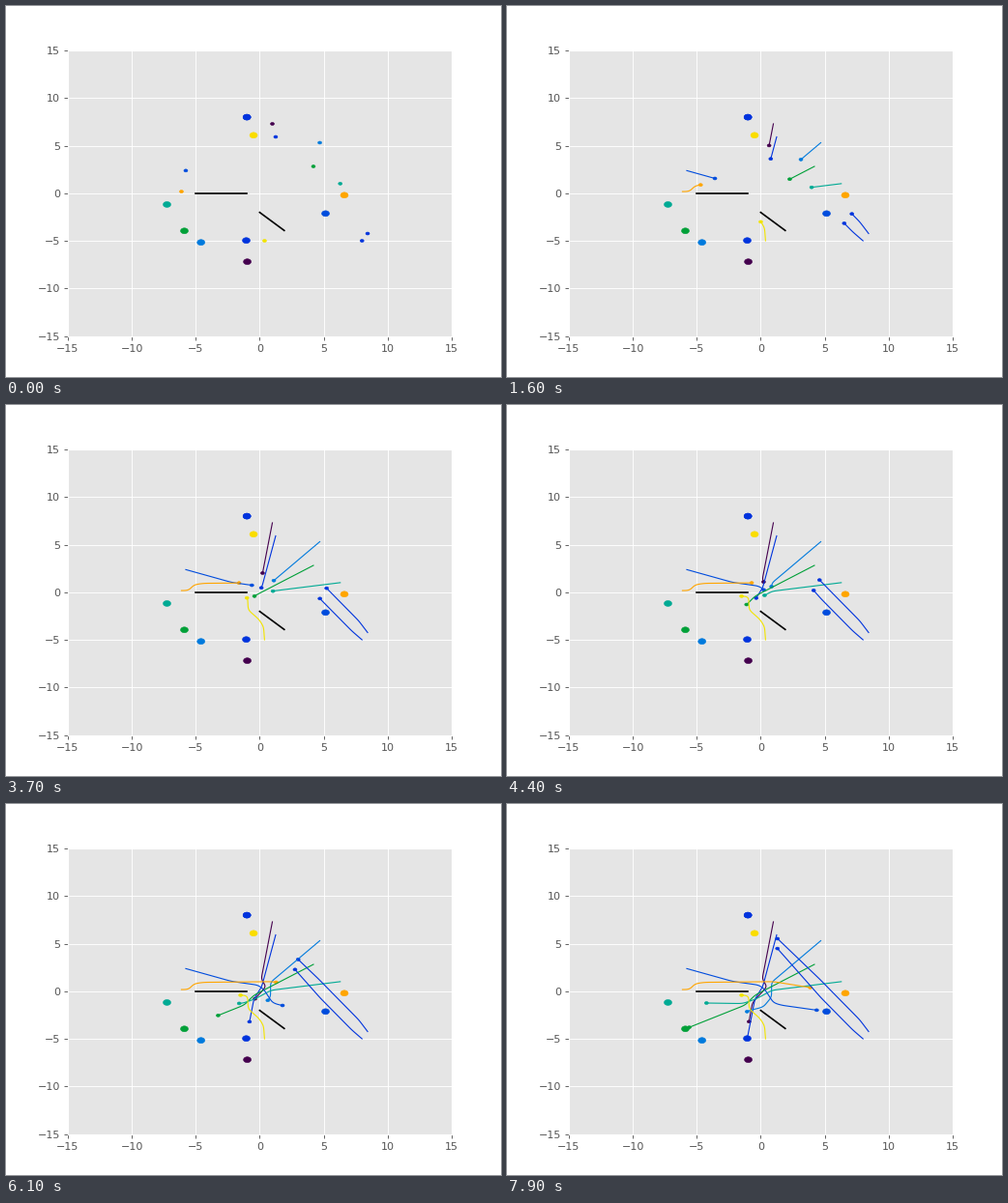
A matplotlib script for the animation above (8 s loop, 512x384 px).

```python
import numpy as np
import matplotlib.pyplot as plt
from matplotlib.animation import FuncAnimation
from matplotlib.patches import Circle

STEPS = 80
STEP_MS = 100
DS = 0.01      # spacing of points along a route
BEND = 60      # half-width of the corner rounding, in points
CROWD = 1.6    # radius of the busy centre

plt.style.use("ggplot")
fig, ax = plt.subplots(figsize=(6.4, 4.8), dpi=80)
ax.set(xlim=(-15, 15), ylim=(-15, 15))


def route(corners):
    """Evenly spaced points along a polyline with rounded corners."""
    xy = np.array(corners, float)
    dist = np.append(0, np.cumsum(np.hypot(*np.diff(xy, axis=0).T)))
    s = np.arange(0, dist[-1], DS)
    kernel = np.hanning(2 * BEND + 1)
    kernel /= kernel.sum()

    def rounded(c):
        padded = np.pad(np.interp(s, dist, c), BEND,
                        mode="reflect", reflect_type="odd")
        return np.convolve(padded, kernel, mode="valid")

    return np.array([rounded(c) for c in xy.T])


def travel(points, speed, pace, delay):
    """Positions per step; the pace changes inside the crowd."""
    s, path = 0, []
    for step in range(STEPS):
        pos = points[:, min(round(s / DS), points.shape[1] - 1)]
        path.append(pos)
        if step >= delay:
            s += speed * (pace if np.hypot(*pos) < CROWD else 1)
    return np.array(path).T


class Robot:
    def __init__(self, color, *corners, goal=None, goal_color=None,
                 speed=0.147, pace=1, delay=0):
        self.path = travel(route(corners), speed, pace, delay)
        ax.add_patch(Circle(goal or corners[-1], 0.3, color=goal_color or color))
        self.body = ax.add_patch(Circle(self.path[:, 0], 0.15, color=color))
        self.trail, = ax.plot([], [], color=color, lw=1)

    def move(self, step):
        self.body.center = tuple(self.path[:, step])
        end = step + 1 if step else 0
        self.trail.set_data(*self.path[:, :end])
        return self.body, self.trail


for xs, ys in (((-5, -1), (0, 0)), ((0, 1.92), (-2, -3.9))):
    ax.plot(xs, ys, color="black", lw=1.5)

robots = [
    Robot("#44004e", (0.99, 7.3), (0.12, 1.3), (0.5, 0.5), (-0.65, -1.2),
          (-0.97, -3.6), (-0.97, -7.18), speed=0.144, pace=0.9),
    Robot("#0033dd", (1.25, 5.93), (0.16, 0.5), (-0.45, -0.8), (-1.05, -4.95),
          pace=1.15),
    Robot("#007add", (4.7, 5.32), (0.85, 0.95), (0.85, -0.6), (0.2, -1.65),
          (-1.01, -2.05), (-4.59, -5.15), pace=0.65),
    Robot("#00a038", (4.2, 2.83), (-0.45, -0.4), (-1.2, -1.43), (-5.89, -3.94),
          pace=1.1),
    Robot("#00aa94", (6.3, 1.02), (0.9, 0.12), (-0.37, -0.8), (-1.4, -1.28),
          (-7.25, -1.17), pace=0.84),
    Robot("#004cdd", (-5.78, 2.39), (-2.2, 1.05), (-0.1, 0.65), (0.35, 0.15),
          (1.0, -1.2), (1.6, -1.45), (5.15, -2.12)),
    Robot("#ffa500", (-6.12, 0.19), (-5.55, 0.19), (-5.15, 0.8), (-4.4, 0.95),
          (1.0, 1.02), (6.62, -0.19), pace=0.8, delay=4),
    Robot("#f2e400", (0.38, -4.98), (0.3, -3.6), (-0.05, -2.85), (-0.9, -1.85),
          (-0.95, -0.45), (-1.5, -0.4), goal=(-0.48, 6.1), goal_color="#fadd00",
          pace=0.7, delay=2),
    Robot("#0033dd", (8.44, -4.22), (7.75, -3.0), (4.6, 1.3), (1.29, 5.57),
          (-1.0, 8.0), speed=0.153),
    Robot("#0033dd", (8.0, -4.98), (7.2, -4.05), (4.73, -0.69), (-1.0, 8.0)),
]


def update(step):
    return [artist for robot in robots for artist in robot.move(step)]


anim = FuncAnimation(fig, update, frames=STEPS, interval=STEP_MS,
                     repeat=True, repeat_delay=0)
plt.show()
```
